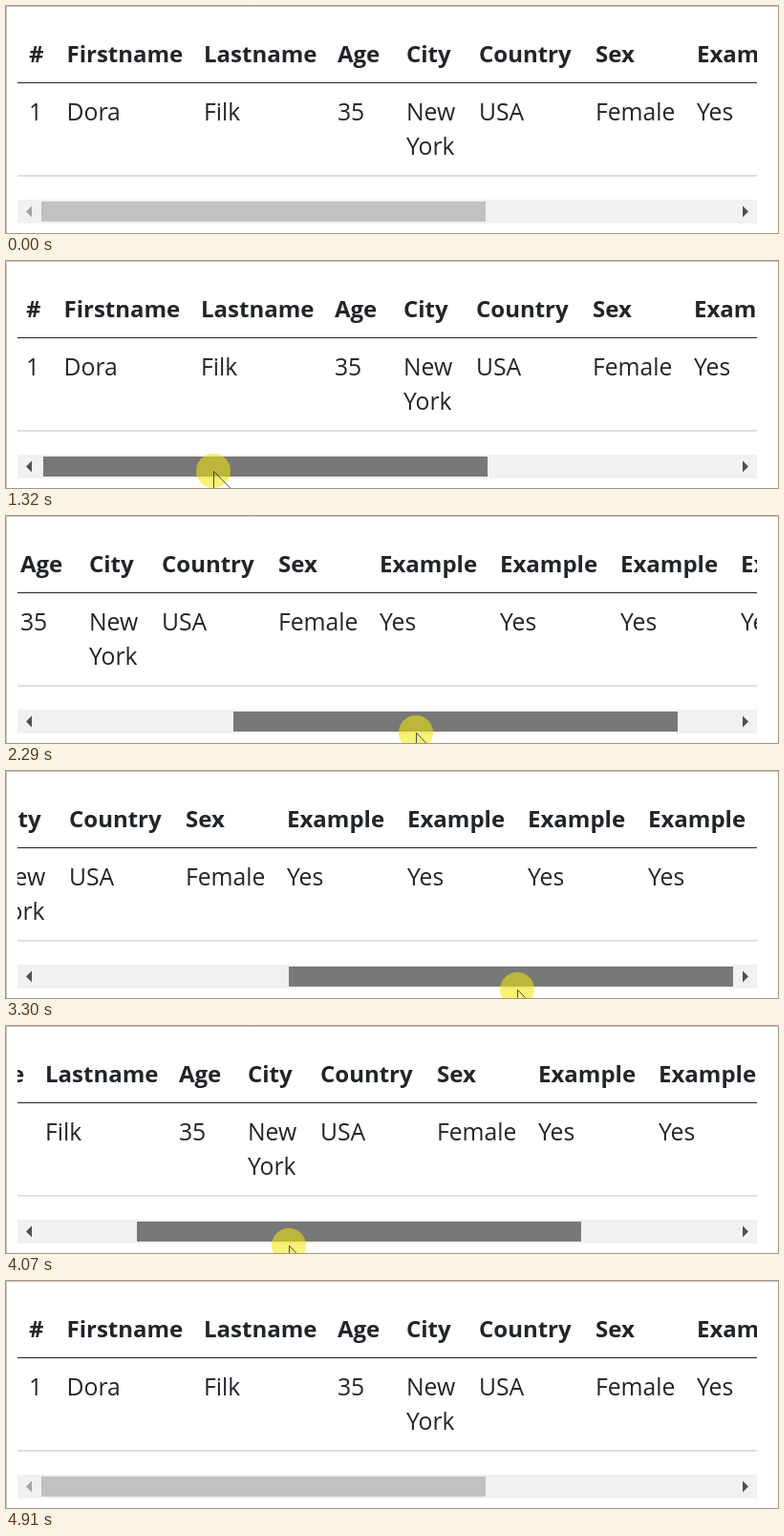
An HTML page for the animation above (5.9 s loop, 808 by 238 pixels).

```html
<!DOCTYPE html>
<html lang="en">
<head>
<meta charset="utf-8">
<title>Scrollable table</title>
<style>
  html, body { margin: 0; width: 100%; height: 100%; overflow: hidden; background: #fff; }
  svg { display: block; width: 808px; height: 238px; }
  text { font: 24.7px "Open Sans", "Noto Sans", sans-serif; fill: #212529; }
  .head { font-size: 24px; font-weight: 700; }
</style>
</head>
<body>
<svg viewBox="0 0 808 238">
  <clipPath id="view"><rect x="12" width="774" height="200"/></clipPath>
  <path d="M0 .5H808M.5 0V238" stroke="#c6c6c6"/>
  <g clip-path="url(#view)"><g id="table"></g></g>
  <rect x="12" y="80" width="774" height="1" fill="#212529"/>
  <rect x="12" y="177" width="774" height="2" fill="#dee0e2"/>
  <rect x="12" y="203" width="774" height="25" fill="#f1f1f1"/>
  <rect id="thumb" y="205" width="465" height="21"/>
  <path id="leftArrow" d="M21 215.5l6-6v12z"/>
  <path d="M777 215.5l-6-6v12z" fill="#505050"/>
  <g id="cursor">
    <circle r="18" fill="#f0e80a" fill-opacity=".56"/>
    <path d="M.5 .5V26l6-6 4 9 4-2-4-8h8z" fill="none" stroke="#333" stroke-opacity=".85"/>
  </g>
</svg>
<script>
const LOOP = 5900;
const MAX_THUMB = 259, MAX_SCROLL = 429;
const GRAB_X = 212.5, LAG = 60;
const [table, thumb, leftArrow, cursor] =
  ['table', 'thumb', 'leftArrow', 'cursor'].map(id => document.getElementById(id));

function addText(x, y, content, className) {
  const node = document.createElementNS('http://www.w3.org/2000/svg', 'text');
  node.setAttribute('x', x);
  node.setAttribute('y', y);
  node.setAttribute('class', className);
  node.textContent = content;
  table.append(node);
}

function addColumn(x, title, ...lines) {
  addText(x, 59, title, 'head');
  lines.forEach((line, i) => addText(x, 120 + 36 * i, line, 'cell'));
}

addColumn(24, '#', '1');
addColumn(63.5, 'Firstname', 'Dora');
addColumn(207, 'Lastname', 'Filk');
addColumn(347, 'Age', '35');
addColumn(419, 'City', 'New', 'York');
addColumn(495, 'Country', 'USA');
addColumn(617, 'Sex', 'Female');
for (let i = 0; i < 4; i++) addColumn(723 + 126 * i, 'Example', 'Yes');

// The pointer enters, drags right with a short slowdown, rests, drags back and leaves
const path = [
  { t: 660, x: GRAB_X, y: 275 },
  { t: 1160, x: GRAB_X, y: 220 },
  { t: 1320, x: 217, y: 220 },
  { t: 1740, x: 315, y: 222 },
  { t: 1800, x: 320, y: 222 },
  { t: 2283, x: 429, y: 227 },
  { t: 2640, x: 538, y: 229 },
  { t: 3230, x: 538, y: 229 },
  { t: 4070, x: 296, y: 230 },
  { t: 4430, x: 212, y: 230 },
  { t: 4800, x: 180, y: 262 }
];

const slope = (a, b, axis) => (b[axis] - a[axis]) / (b.t - a.t);

// Harmonic-mean tangents keep the curve free of overshoot
function tangent(i, axis) {
  if (i === 0 || i === path.length - 1) return 0;
  const before = slope(path[i - 1], path[i], axis);
  const after = slope(path[i], path[i + 1], axis);
  return before * after > 0 ? 2 * before * after / (before + after) : 0;
}

function pointer(t, axis) {
  const next = path.findIndex(p => p.t > t);
  if (next === 0) return path[0][axis];
  if (next < 0) return path.at(-1)[axis];
  const a = path[next - 1], b = path[next];
  const span = b.t - a.t, u = (t - a.t) / span, v = 1 - u;
  return a[axis] + (b[axis] - a[axis]) * u * u * (3 - 2 * u)
    + span * u * v * (v * tangent(next - 1, axis) - u * tangent(next, axis));
}

// The picture advances in short ticks, restarted after the rest
function snap(t) {
  const [start, step] = t < 3300 ? [1317, 69] : [3300, 70];
  return start + Math.floor((t - start) / step) * step;
}

function thumbColor(t) {
  const pressed = t >= 1170 && t < 4640;
  const hovered = t >= 940 && t < 1170;
  return pressed ? '#787878' : hovered ? '#a8a8a8' : '#c1c1c1';
}

function draw(time) {
  const t = snap(time % LOOP);
  const pulled = pointer(t - LAG, 'x') - GRAB_X;
  const offset = Math.min(MAX_THUMB, Math.max(0, pulled));
  const thumbOffset = Math.round(offset);
  const scroll = Math.round(offset * MAX_SCROLL / MAX_THUMB);

  table.setAttribute('transform', `translate(${-scroll} 0)`);
  thumb.setAttribute('x', 37 + thumbOffset);
  thumb.setAttribute('fill', thumbColor(t));
  leftArrow.setAttribute('fill', thumbOffset > 0 ? '#505050' : '#a3a3a3');
  cursor.setAttribute('transform',
    `translate(${Math.round(pointer(t, 'x'))} ${Math.round(pointer(t, 'y'))})`);
}

const begin = performance.now();
function frame() {
  draw(performance.now() - begin);
  requestAnimationFrame(frame);
}
frame();
</script>
</body>
</html>
```
